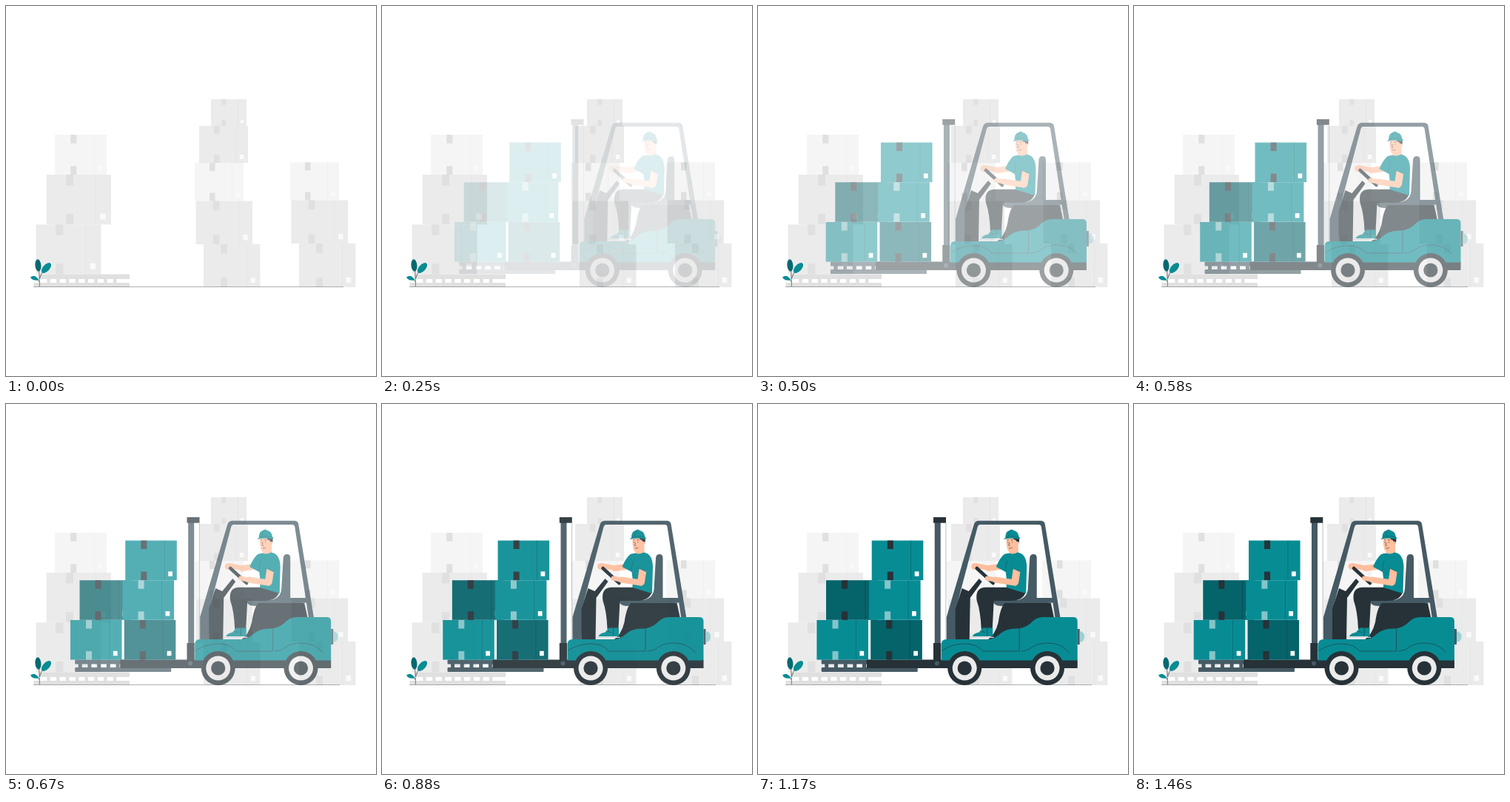
Recreate the animation shown at these times as an HTML page. Size 500 px wide and 500 px high, loop 1500 ms.

```html
<!DOCTYPE html>
<html lang="en">
<head>
<meta charset="utf-8">
<title>Forklift</title>
<style>
  html, body { margin: 0; width: 100%; height: 100%; overflow: hidden; background: #fff; }
  svg { display: block; width: 100%; height: 100%; }
  .slate { fill: #455a64; }
  .dark { fill: #263238; }
  .teal { fill: #088c94; }
  .skin { fill: #ffbe9d; }
  .line { fill: none; stroke: #263238; stroke-width: .6; }
  .arm { fill: none; stroke: #ffbe9d; stroke-linecap: round; stroke-linejoin: round; }
</style>
</head>
<body>
<svg viewBox="0 0 500 500">
  <g id="stacks"></g>
  <g id="rack" fill="#e0e0e0">
    <rect x="43" y="362.5" width="124" height="6.5"/>
    <rect x="37.5" y="374" width="129.5" height="6"/>
  </g>
  <path id="ground" d="M37 379.5H451" stroke="#8a8f91" stroke-width=".7"/>

  <g id="plant">
    <path class="line" d="M45.3 379Q46 366 44 352M45.5 368Q47 361 54 354M45.2 373Q44 369 39 367"/>
    <ellipse cx="43.4" cy="350.5" rx="4" ry="8.2" transform="rotate(-5 43.4 350.5)" fill="#056a70"/>
    <ellipse cx="54.5" cy="354" rx="4.5" ry="8.4" transform="rotate(43 54.5 354)" class="teal"/>
    <path d="M33 366.5Q39 361.500 44.500 370.500Q36 372 33 366.500Z" class="teal"/>
  </g>

  <g id="truck" opacity="0">
    <g id="pallet" class="slate">
      <rect x="87" y="345.5" width="70" height="6" rx="1"/>
      <rect x="87" y="356" width="130" height="6" rx="1"/>
    </g>
    <rect class="dark" x="148" y="345.5" width="110" height="11.500"/>
    <g id="load"></g>

    <rect class="slate" x="240" y="160" width="8" height="165"/>
    <rect class="dark" x="238.3" y="153" width="17" height="7.700"/>
    <rect class="dark" x="238.3" y="323" width="10.200" height="24"/>
    <path d="M255.200 160V345" stroke="#9aa3a7" stroke-width=".7"/>

    <path class="slate" d="M318 264L352 265Q365 262 366 250L368.500 208Q369 203 373.500 203Q378 203 378 208V262H400V268.500L330 273Q319 273 318 264Z"/>
    <path class="dark" d="M335 269H397L402 292L392 320H310Q322 312 326 295Q329 274 335 269Z"/>
    <path class="slate" fill-rule="evenodd" d="M256 320V288L293 163Q294.500 158 299 157.700H384Q388 158 389 162L410 290H403L384 165.500Q383.500 163 381 163H301Q299 163 298 166L270 272L268 320Z"/>
    <path class="dark" d="M268 320V277L277 249L286 253L300 236L304 240L288 262L287 320Z"/>

    <path class="arm" stroke-width="8" d="M334 219L313 222"/>
    <path class="arm" stroke-width="6.500" d="M315 222L296 218.500"/>
    <ellipse class="skin" cx="294" cy="219.500" rx="4.500" ry="4.200"/>
    <path class="skin" d="M342 193H353V203Q347 207 341 202Z"/>
    <path class="skin" d="M337 180H353V192Q351 200 345 201Q339 201 338 195L337 190Z"/>
    <path class="dark" d="M346.500 180H354Q355 185 353.500 188L351 187L350 184L347 183Z"/>
    <circle class="skin" cx="351.600" cy="188" r="2.300"/>
    <path class="line" d="M339 186V187.500M344.500 186V187.500M338 184L340 183.500M343 183.500L346 184M341 187L340 191L342 191.500M340.500 194.500Q343 196 345 194"/>
    <path class="teal" d="M335.500 181Q335.500 172 341 171Q344 168 347 171Q353 172 354 180L355.500 181Q355 183 352 182.500Q342 180.500 334 183Q333 182 335.500 181Z"/>
    <path class="line" d="M336 179.500Q344 177.500 354 180M342 171Q340 175 340 178.500" stroke-opacity=".5"/>

    <path class="dark" d="M363 254Q360 266 342 266H320L318 304H303Q302 280 297 266Q294 249 308 247.800H342Z"/>
    <path class="teal" d="M334 203Q338 201.500 341 201.500Q346 204 352 200.500Q364 202 364.500 220L363.500 256Q350 252 337 248Q338 238 336 227L323 220Q328 208 334 203Z"/>
    <path class="line" d="M335 226L338 212" stroke-opacity=".6"/>
    <path d="M297 222L319 242" stroke="#263238" stroke-width="4.500" stroke-linecap="round"/>
    <path class="arm" stroke-width="10" d="M351 224L348.500 240.500"/>
    <path class="arm" stroke-width="8" d="M348 241.500L322 237.500"/>
    <path class="arm" stroke-width="6" d="M324 238L311 235.500"/>
    <path class="teal" d="M343 221Q346 210 353 208L361 214L355.500 227Z"/>
    <path class="line" d="M343 221L355.500 226.500" stroke-opacity=".5"/>
    <path class="teal" d="M305 302.500H318.500V314H291Q292 310 300 308.500Z"/>
    <path class="line" d="M304 307L308 309M311 303V313"/>
    <path d="M288 315.300H320" stroke="#cfd8dc" stroke-width="1.200"/>

    <rect class="dark" x="249" y="345.500" width="184" height="11.500"/>
    <path class="teal" d="M249 346.500V325Q249 318 256 318H313Q322 317 329 310Q337 303.500 349 303.500H354Q366 301 372 294Q378 288 386 288H428Q433 288 433 294V346.500Z"/>
    <path class="line" d="M250 333Q264 324 281 324Q297 324 305 334H354.500V303.500M357 334Q367 333 371 329Q380 323 392 323Q406 323 414 329L422 336"/>
    <circle class="slate" cx="243" cy="350.500" r="3"/>
    <rect class="slate" x="433" y="304" width="3" height="21"/>
    <path d="M436 307Q442.500 308 442.500 314.500Q442.500 321 436 322Z" fill="#9bd1d4"/>
    <g id="wheels"></g>
  </g>
</svg>
<script>
const NS = 'http://www.w3.org/2000/svg';
const $ = id => document.getElementById(id);

function add(parent, tag, attrs) {
  const el = document.createElementNS(NS, tag);
  for (const k in attrs) el.setAttribute(k, attrs[k]);
  return parent.appendChild(el);
}
const rect = (g, x, y, width, height, fill) => add(g, 'rect', { x, y, width, height, fill });

// A carton: two tape ends, a seam and a label, all in proportion.
function carton(g, x, y, w, h, fill, tape, seam, label) {
  rect(g, x, y, w, h, fill);
  const th = h * .215;
  for (const ty of [y, y + h - th]) rect(g, x + w * .303, ty, w * .115, th, tape);
  rect(g, x + w * .757, y, .6, h, seam);
  rect(g, x + w * .833, y + h * .78, w * .083, h * .12, label);
}

const pale = '#f5f5f5', grey = '#ebebeb';
[
  [66, 174, 70, 54, pale], [54.5, 228, 87.5, 67.3, grey], [40.5, 295.3, 88, 67.2, grey],
  [277, 126, 48, 36, grey], [261, 162, 66, 50, grey], [255, 212, 66, 51.5, pale],
  [256.5, 263.5, 76.5, 58.5, grey], [267, 322, 76.5, 58, grey],
  [384, 211.3, 66, 51.2, pale], [385.5, 262.5, 76.5, 58.5, grey], [396, 321, 76.5, 59, grey]
].forEach(b => carton($('stacks'), ...b, '#e0e0e0', b[4] === pale ? grey : '#e2e2e2', '#fafafa'));

const teal = '#088c94', deep = '#05636a', mint = '#83c5c9', ink = '#263238';
[
  [155, 184.5, teal, ink], [93.3, 238.2, deep, ink], [151.3, 238.2, teal, mint],
  [80.7, 292, teal, mint], [153.5, 292, deep, ink]
].forEach(([x, y, fill, tape]) => carton($('load'), x, y, 69.6, 53.6, fill, tape, deep === fill ? '#044a50' : deep, '#fff'));

// Slats between the pallet boards.
for (let i = 0; i < 8; i++) rect($('rack'), 55.3 + i * 12.8, 369, 4.5, 5);
for (let i = 0; i < 5; i++) rect($('pallet'), 91.5 + i * 12.7, 351, 5, 5.5);

for (const cx of [280.5, 392.3]) {
  [[23, ink], [16.5, grey], [9.6, ink]].forEach(([r, fill]) => add($('wheels'), 'circle', { cx, cy: 357, r, fill }));
}

const LOOP = 1500, STEPS = 36, SLIDE = 20;

// cubic-bezier(.36, -.01, .5, 1.38)
function ease(x) {
  const curve = (s, a, b) => 3 * (1 - s) * (1 - s) * s * a + 3 * (1 - s) * s * s * b + s * s * s;
  let lo = 0, hi = 1;
  for (let i = 0; i < 30; i++) {
    const mid = (lo + hi) / 2;
    if (curve(mid, .36, .5) < x) lo = mid; else hi = mid;
  }
  return curve(hi, -.01, 1.38);
}

const start = performance.now();
function draw(now) {
  const t = Math.max(0, now - start) % LOOP;
  const step = Math.min(STEPS - 1, Math.floor((t + 5) * STEPS / LOOP));
  const y = ease((step + 1) / STEPS);
  $('truck').setAttribute('opacity', step < 4 ? 0 : Math.min(1, y));
  $('truck').setAttribute('transform', `translate(${SLIDE * (1 - y)} 0)`);
  $('ground').setAttribute('d', `M37 379.5H${step < 13 ? 456 : 451}`);
  requestAnimationFrame(draw);
}
draw(start);
</script>
</body>
</html>
```
